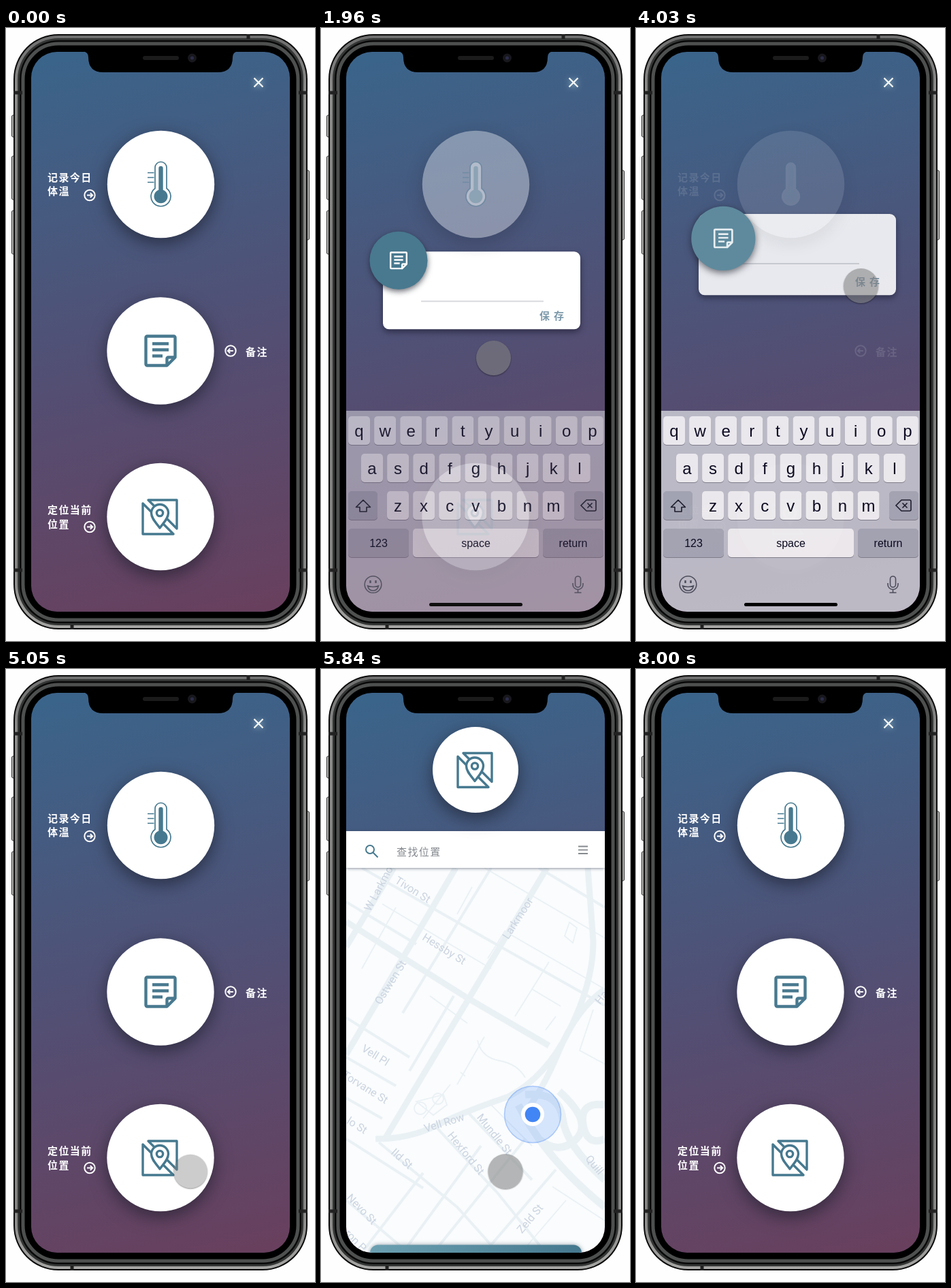
Recreate the animation shown at these times as an HTML page. Size 454x900 px, loop 8.07 s.

```html
<!DOCTYPE html>
<html lang="zh">
<head>
<meta charset="utf-8">
<style>
html, body { margin: 0; height: 100%; overflow: hidden; background: #fefefe; }
svg { display: block; width: 454px; height: 900px; }
text { dominant-baseline: central; }
.line { fill: none; stroke: #46798f; }
.disc { fill: #fff; filter: drop-shadow(0 8px 13px rgba(25,28,40,.65)); }
.fade > * { opacity: var(--o); }
.cjk { font: 900 15px "Noto Sans CJK SC", "Noto Sans CJK", sans-serif; letter-spacing: 1.4px; fill: #fff; }
.streets { font: 16px Roboto, sans-serif; fill: #cbd4e0; text-anchor: middle; }
.keys { font: 24px "Liberation Sans", Arial, sans-serif; fill: #0c0a20; text-anchor: middle; }
.keys .small { font-size: 16px; }
.road { fill: none; stroke: #eaf1f5; }
#cursor { position: absolute; left: -25.5px; top: -25.5px; width: 51px; height: 51px; border-radius: 50%;
  box-shadow: 0 1px 2px rgba(0,0,0,.45); }
</style>
</head>
<body>
<svg viewBox="0 0 454 900">
<defs>
  <linearGradient id="bg" gradientUnits="userSpaceOnUse" x1="130" y1="35" x2="330" y2="860">
    <stop offset="0" stop-color="#3b648a"/><stop offset=".5" stop-color="#515075"/><stop offset="1" stop-color="#68405e"/>
  </linearGradient>
  <linearGradient id="teal"><stop stop-color="#6ba0b1"/><stop offset="1" stop-color="#44788e"/></linearGradient>
  <linearGradient id="metal" x2="0" y2="1">
    <stop stop-color="#6d6e6d"/><stop offset=".1" stop-color="#8c8d8b"/><stop offset=".5" stop-color="#777876"/>
    <stop offset=".9" stop-color="#858684"/><stop offset="1" stop-color="#a5a5a3"/>
  </linearGradient>
  <clipPath id="screen"><rect x="37" y="35" width="380" height="822" rx="38"/></clipPath>
  <g id="arrow" fill="none" stroke="#fff" stroke-width="2">
    <circle r="7.7"/><path d="M-4 0H4M.8 -3.4L4.2 0L.8 3.4"/>
  </g>
</defs>

<g fill="#b4b4b2" stroke="#333">
  <rect x="8.500" y="128" width="6" height="32" rx="2"/><rect x="8.500" y="188" width="6" height="64" rx="2"/>
  <rect x="8.500" y="268" width="6" height="64" rx="2"/><rect x="440" y="209" width="5.500" height="102" rx="2"/>
</g>
<rect x="11" y="9" width="432" height="874" rx="66" fill="#0a0a0a"/>
<rect x="13" y="11" width="428" height="870" rx="64" fill="url(#metal)"/>
<rect x="17" y="15" width="420" height="862" rx="60" fill="#343635"/>
<rect x="20" y="18" width="414" height="856" rx="57" fill="#080808"/>
<rect x="25" y="23" width="404" height="846" rx="52" stroke="#4d504f" stroke-width="5"/>
<rect x="29" y="27" width="396" height="838" rx="47"/>
<path d="M11 95H24M430 95H443M11 796H24M430 796H443M356 9V16M97 876V883" stroke="#222" stroke-width="5"/>

<g clip-path="url(#screen)">
  <rect x="37" y="35" width="380" height="822" fill="url(#bg)"/>
  <g id="labels" class="cjk">
    <text x="61" y="218">记录今日</text><text x="61" y="238">体温</text><use href="#arrow" x="123" y="245.500"/>
    <text x="352" y="474.500">备注</text><use href="#arrow" transform="translate(330 474) scale(-1 1)"/>
    <text x="61" y="706">定位当前</text><text x="61" y="727">位置</text><use href="#arrow" x="123" y="732.500"/>
  </g>
  <path id="close" d="M364.500 73.500L377.500 86.500M377.500 73.500L364.500 86.500" stroke="#fff" stroke-width="2.200" style="filter:drop-shadow(0 1px 4px #9dc3d0)"/>

  <g id="card">
    <rect id="paper" width="290" rx="9" fill="#fff" style="filter:drop-shadow(0 4px 5px rgba(20,20,40,.6))"/>
    <path d="M56 73H236" stroke="#d8dadd" stroke-width="2"/>
    <text id="save" class="cjk" x="230" style="fill:#7d9aab;letter-spacing:6px">保存</text>
  </g>

  <g id="map">
    <rect x="37" y="238" width="380" height="640" fill="#fafcfd"/>
    <g class="road" stroke-width="1.800">
      <path d="M200 360L222 320M240 292L417 395M90 345L250 440M60 440L110 350M245 425L270 385L417 470M285 510L335 430
        M160 480L215 520M240 540L200 610M230 545Q235 570 262 575T300 600M365 372L358 392L370 402L376 380ZM310 470L352 495M330 530L345 510
        M140 635L180 625L185 640L165 655ZM150 660L190 610M205 592L212 598M250 640L310 700M340 760L417 810M300 850L360 780M400 500L380 560L417 580"/>
      <circle cx="146" cy="645" r="9"/><circle cx="172" cy="631" r="8"/>
    </g>
    <g class="road" stroke-width="4">
      <path d="M60 292L250 400L417 494M37 342L140 404M250 292L120 505M37 512L130 570M37 570L110 612M37 630L90 660M37 690L150 762M85 695L200 790L260 857
        M165 668L260 770L330 857M215 650L310 750M120 857L235 700M165 857L300 690M240 857L345 735M60 857L150 740M37 780L120 850M320 292L417 350M195 480L130 590"/>
    </g>
    <g class="road" stroke-width="9">
      <path d="M107 292L37 408M198 292L37 566M332 292L95 688M37 371L215 483L335 553" />
      <path d="M80 690Q130 690 170 670T275 628Q330 600 365 530T400 400L392 292M417 470Q375 500 350 560T300 650"/>
      <path d="M300 625Q350 620 355 660T417 750M290 640Q330 720 417 790M417 640Q380 635 385 668T417 690M320 690Q350 715 375 690T350 620" stroke-width="11"/>
    </g>
    <g id="streets" class="streets"></g>
    <circle cx="311" cy="654" r="41.500" fill="#4285f4" fill-opacity=".2" stroke="#4285f4" stroke-opacity=".38" stroke-width="1.500"/>
    <circle cx="311" cy="654" r="17" fill="#fff"/><circle cx="311" cy="654" r="11.300" fill="#4285f4"/>
    <rect x="37" y="238" width="380" height="54" fill="#fff" style="filter:drop-shadow(0 1px 2px rgba(30,40,60,.5))"/>
    <path class="line" stroke-width="2" d="M78 265a6 6 0 1 0-12 0a6 6 0 1 0 12 0M76.500 269.500L83.500 276.500"/>
    <text class="cjk" x="111" y="267" style="fill:#84898f;font-weight:400">查找位置</text>
    <path d="M378 260.500H392M378 265.700H392M378 271H392" stroke="#858a8e" stroke-width="1.800"/>
  </g>
  <rect id="sheet" x="72" width="311" height="76" rx="12" fill="url(#teal)" style="filter:drop-shadow(0 0 3px rgba(30,60,80,.5))"/>

  <g id="thermo" class="fade">
    <circle class="disc" cx="227.500" cy="229.500" r="78.700"/>
    <path d="M219 235.500V205a8.500 8.500 0 0 1 17 0V235.500a14.500 14.500 0 1 1-17 0Z" fill="#fff" stroke="#46798f" stroke-width="1.700"/>
    <path d="M208 212.500H217.500M208 219.500H217.500M208 226.500H217.500" class="line" stroke-width="1.700"/>
    <path d="M224.300 206a3.200 3.200 0 0 1 6.400 0V237.800a10 10 0 1 1-6.400 0Z" fill="#46798f"/>
  </g>
  <g id="place" class="fade">
    <circle id="placeDisc" class="disc"/>
    <g transform="translate(-1 .5)" class="line" stroke-width="3.400" stroke-linejoin="round">
      <path d="M-17 -25H25V17ZM-25 -20V25H20Z"/>
      <path d="M0 16C-5 9 -12.500 2 -12.500 -6a12.500 12.500 0 0 1 25 0C12.500 2 5 9 0 16Z" fill="#fff"/>
      <circle cy="-6" r="4.600"/>
    </g>
  </g>

  <g class="keys">
    <g id="caps"></g>
    <g id="glyphs">
      <g id="letters"></g>
      <g fill="none" stroke="#1c1c2c" stroke-width="1.600">
        <path d="M62 693L51.500 703.500H57V710H67V703.500H72.500Z" stroke-linejoin="round"/>
        <path d="M390 693H402a2 2 0 0 1 2 2V707a2 2 0 0 1-2 2H390L382 701ZM391.500 697.500L398.500 704.500M398.500 697.500L391.500 704.500"/>
        <g stroke="#4d4d5c">
          <circle cx="76.500" cy="817" r="12.300"/><path d="M68.500 819Q76.500 822 84.500 819Q83 826 76.500 826T68.500 819Z"/>
          <path d="M72.500 811V815M80.500 811V815" stroke-width="2.500"/>
          <rect x="373.500" y="805" width="8" height="16" rx="4"/><path d="M370 815V817a7.500 7.500 0 0 0 15 0V815M377.500 824.500V829M372.500 829H382.500"/>
        </g>
      </g>
      <rect x="159" y="844" width="137" height="5" rx="2.500" fill="#000"/>
    </g>
  </g>

  <g id="note">
    <circle id="noteDisc"/>
    <g id="noteIcon" fill="none" stroke-width="4.400" stroke-linejoin="round">
      <path d="M9.500 21.500H-19.500a2 2 0 0 1-2-2V-19.500a2 2 0 0 1 2-2H19.500a2 2 0 0 1 2 2V9.500L9.500 21.500V11.500a2 2 0 0 1 2-2H21.500M-12 -10.500H12M-12 -1.500H12M-12 7.500H3"/>
    </g>
  </g>
  <path d="M112 34Q121 35 121 43Q121 65 143 65H311Q333 65 333 43Q333 35 342 34Z"/>
</g>
<rect x="201" y="41" width="53" height="6" rx="3" fill="#1b1b1c"/>
<circle cx="273.500" cy="44" r="6.500" fill="#17171c"/><circle cx="273.500" cy="44" r="2.500" fill="#2a2c48"/>
</svg>
<div id="cursor"></div>

<script>
const $ = id => document.getElementById(id);
const LOOP = 8070, TEAL = [72, 121, 143], WHITE = [255, 255, 255];

// Keyboard
let caps = '<rect x="37" y="562" width="380" height="296" fill="#c9cad3"/>', letters = '';
function key(x, y, w, label, grey) {
  const cap = (top, fill) => `<rect x="${x}" y="${top}" width="${w}" height="42" rx="5" fill="${fill}"/>`;
  caps += cap(y + 1, '#85858f') + cap(y, grey ? '#adb1bd' : '#fff');
  letters += `<text x="${x + w / 2}" y="${y + 21}" class="${label.length > 1 ? 'small' : ''}">${label}</text>`;
}
const row = (text, x, y) => [...text].forEach((c, i) => key(x + i * 38.1, y, 32, c));
row('qwertyuiop', 40, 570);
row('asdfghjkl', 59, 625);
row('zxcvbnm', 97, 680);
key(40, 680, 43, '', true);
key(372, 680, 43, '', true);
key(40, 735, 89, '123', true);
key(135, 735, 185, 'space');
key(326, 735, 89, 'return', true);
$('caps').innerHTML = caps;
$('letters').innerHTML = letters;

// Street names: text, x, y, angle
$('streets').innerHTML = [
  ['W Larkmoor', 88, 316, -62], ['Tivon St', 135, 324, 32], ['Hessby St', 181, 411, 32], ['Larkmoor', 289, 366, -57],
  ['Ostwen St', 102, 460, -58], ['Vell Pl', 80, 567, 32], ['Torvane St', 65, 614, 32], ['lo St', 53, 670, 32],
  ['Vell Row', 181, 666, -17], ['Mundle St', 255, 683, 51], ['Hexford St', 213, 711, 51], ['Ild St', 119, 719, 42],
  ['Nevo St', 60, 793, 46], ['Zeld St', 307, 807, -50], ['Ha', 412, 482, -50], ['Quill', 402, 728, 50], ['ron P', 51, 839, 46]
].map(([name, x, y, a]) => `<text transform="translate(${x} ${y}) rotate(${a})">${name}</text>`).join('');

// Timing
const ramp = (t, start, length) => Math.min(1, Math.max(0, (t - start) / length));
const easeOut = (t, start) => 1 - (1 - ramp(t, start, 340)) ** 3;
const between = (t, show, hide) => easeOut(t, show) - easeOut(t, hide);
const mix = (a, b, k) => a + (b - a) * k;
const blend = (a, b, k) => `rgb(${a.map((v, i) => mix(v, b[i], k))})`;

const track = [[60, 409, 773], [640, 253, 484], [2500, 253, 484], [2501, 224, 674], [2770, 224, 674], [3530, 330, 378],
  [4350, 330, 378], [4750, 270.5, 737], [6050, 270.5, 737], [6220, 265.5, 778.5], [7860, 265.5, 778.5], [8000, 292, 860]];
const taps = [[690, 980], [1570, 1870], [3600, 4005], [4930, 5240], [6260, 6500]];

function cursorAt(t) {
  let [, x, y] = track[0];
  for (let i = 1; i < track.length; i++) {
    const [from] = track[i - 1], [to, nx, ny] = track[i];
    let k = ramp(t, from, to - from);
    k = k * k * (3 - 2 * k);
    x = mix(x, nx, k);
    y = mix(y, ny, k);
  }
  return [x, y];
}

function set(id, attrs) {
  for (const name in attrs) $(id).setAttribute(name, attrs[name]);
}

function draw(t) {
  const card = between(t, 980, 4016), typing = between(t, 1872, 4016);
  const map = between(t, 5240, 6808.5), sheet = between(t, 5828, 6500);
  const scroll = -553 * map;

  set('labels', { opacity: (1 - card) * (1 - map) ** 4, transform: `translate(0 ${scroll})` });
  set('close', { opacity: 1 - map });
  set('caps', { opacity: typing });
  set('glyphs', { opacity: Math.min(1, 1.5 * typing) });

  const height = mix(156, 114, card);
  const top = t < 4000 ? 412 - 140 * typing : 280 - 8 * typing;
  set('card', { opacity: card, transform: `translate(${99 - 8 * card} ${top})` });
  set('paper', { height });
  set('save', { y: height - 21 });

  set('map', { transform: `translate(0 ${620 * (1 - map)})` });
  set('sheet', { y: mix(858, 745, sheet), opacity: sheet > 0 ? 1 : 0 });

  const fade = `--o:${(1 - typing) * (1 - .1 * card)}`;
  set('thermo', { transform: `translate(0 ${scroll})`, style: fade });
  set('place', { transform: `translate(227 ${717.5 - 569.5 * map})`, style: fade });
  set('placeDisc', { r: mix(78.7, 63, map) });

  set('note', { transform: `translate(${227 - 113 * card} ${474 - 49 * card - 140 * typing + scroll})` });
  set('noteDisc', {
    r: mix(78.7, 42.5, card), fill: blend(WHITE, TEAL, card),
    style: `filter:drop-shadow(0 ${mix(8, 3, card)}px ${mix(13, 4, card)}px rgba(25,28,40,.65))`
  });
  set('noteIcon', { transform: `scale(${1 - .45 * card})`, stroke: blend(TEAL, WHITE, card) });

  const [x, y] = cursorAt(t);
  const press = taps.reduce((sum, [down, up]) => sum + ramp(t, down, 70) - ramp(t, up, 20), 0);
  const cursor = $('cursor').style;
  cursor.transform = `translate(${x}px, ${y}px) scale(${1 - .03 * press})`;
  cursor.background = `rgba(128, 128, 128, ${.57 - .17 * press})`;
  cursor.opacity = ramp(t, 50, 100) - ramp(t, 2030, 130) + ramp(t, 2780, 100) - ramp(t, 7860, 130);
}

function frame(now) {
  draw(now % LOOP);
  requestAnimationFrame(frame);
}
frame(performance.now());
</script>
</body>
</html>
```
